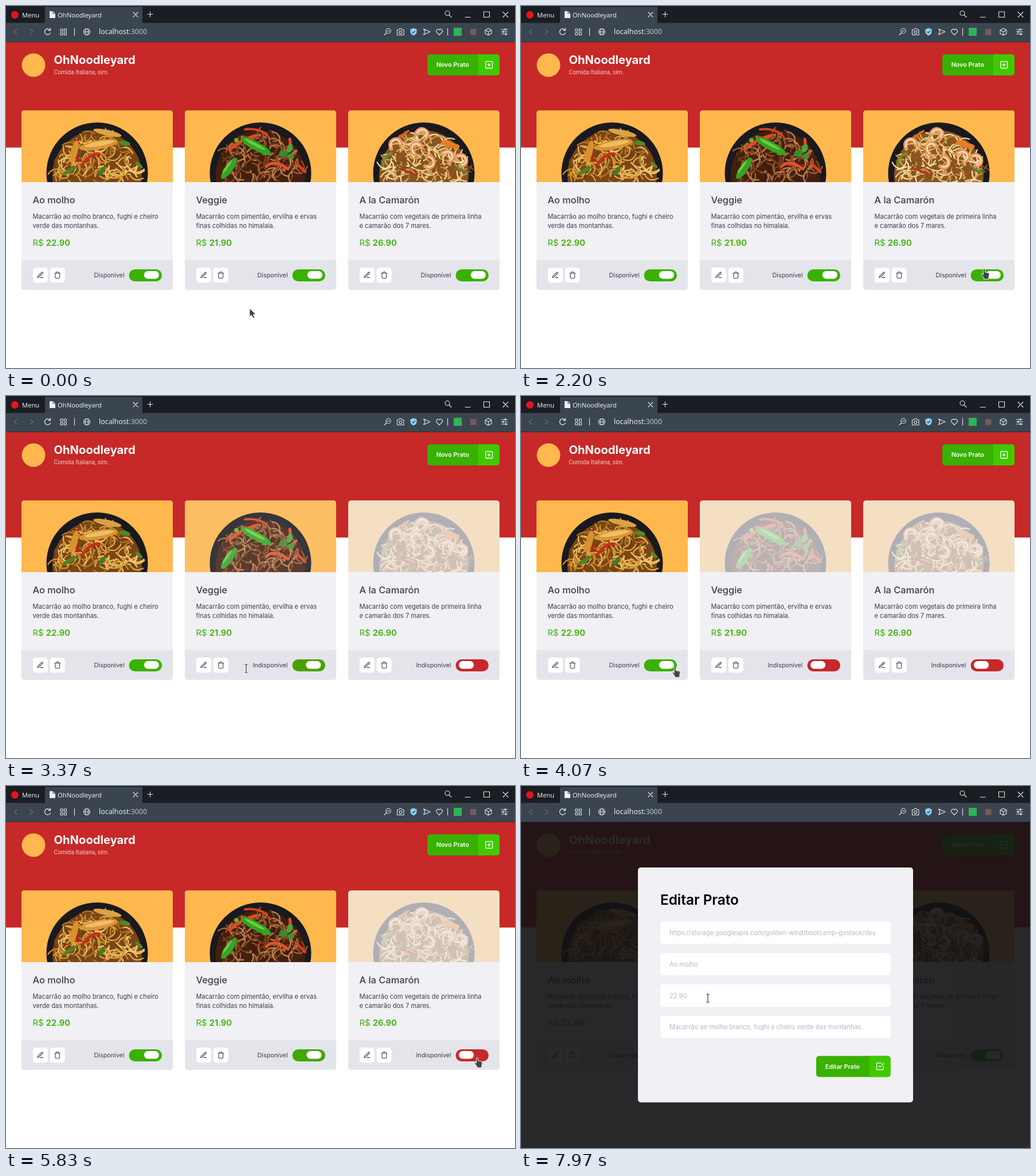
These frames come from a looping animation (888x631 px, 8 s). An HTML page:

```html
<!DOCTYPE html>
<html lang="pt">
<head>
<meta charset="utf-8">
<title>OhNoodleyard</title>
<style>
html, body { margin: 0; width: 100%; height: 100%; overflow: hidden; background: #fff; }
svg { display: block; }
text { font-family: Inter, Roboto, sans-serif; white-space: pre; }
.ui { font-family: "Noto Sans", "Open Sans", sans-serif; fill: #e9ecee; }
.icon { fill: none; stroke-width: 2; stroke-linecap: round; stroke-linejoin: round; }
.bar { fill: none; stroke: #e3e6e8; stroke-width: 1.1; stroke-linecap: round; stroke-linejoin: round; }
.name { font-size: 16.4px; font-weight: 500; fill: #3d3d4d; }
.desc { font-size: 11.05px; fill: #3d3d4d; }
.price { font-size: 14.8px; fill: #39b100; }
.price tspan, .button { font-weight: 600; }
.state { font-size: 10.8px; fill: #3d3d4d; text-anchor: end; }
.button { font-size: 10.7px; fill: #fff; }
.field { font-size: 11.05px; fill: #b7b7cc; }
.photo, .switch, .knob { animation: 8s ease infinite; }
.on, .off, .shape, #modal { animation: 8s step-end infinite; }
#cursor { animation: move 8s linear infinite; }
#modal { animation-name: modal; }
.shape { opacity: 0; }
@keyframes modal { 0% { opacity: 0 } 88.31%, to { opacity: 1 } }
</style>
</head>
<body>
<svg width="888" height="631" viewBox="0 0 888 631">
  <defs>
    <clipPath id="round"><rect width="264" height="313" rx="5"/></clipPath>
    <g id="edit" class="icon"><path d="M12 20h9M16.5 3.5a2.12 2.12 0 0 1 3 3L7 19l-4 1 1-4z"/></g>
    <g id="trash" class="icon"><path d="M3 6h18M19 6v14a2 2 0 0 1-2 2H7a2 2 0 0 1-2-2V6m3 0V4a2 2 0 0 1 2-2h4a2 2 0 0 1 2 2v2"/></g>
    <g id="plus" class="icon"><rect x="3" y="3" width="18" height="18" rx="2"/><path d="M12 8v8M8 12h8"/></g>
    <g id="check" class="icon"><path d="M9 11l3 3L22 4M21 12v7a2 2 0 0 1-2 2H5a2 2 0 0 1-2-2V5a2 2 0 0 1 2-2h11"/></g>
  </defs>

  <rect width="888" height="631" fill="#fff"/>
  <rect y="63" width="888" height="183.7" fill="#c72828"/>
  <circle cx="48" cy="103" r="20.5" fill="#ffb84d"/>
  <text x="83.5" y="100.5" font-size="20.2" font-weight="700" fill="#fff">OhNoodleyard</text>
  <text x="83.5" y="119" font-size="10.3" fill="#f5c9c4" style="font-family:Roboto,sans-serif">Comida Italiana, sim.</text>
  <g id="add"></g>
  <g id="cards"></g>

  <g id="modal">
    <rect y="63" width="888" height="568" fill="#121214" fill-opacity=".9"/>
    <rect x="204" y="142" width="480" height="409.5" rx="5" fill="#f0f0f5"/>
    <text x="243" y="207" font-size="24.3" font-weight="600">Editar Prato</text>
    <g id="fields"></g>
    <g id="save"></g>
  </g>

  <g id="browser">
    <rect width="888" height="30" fill="#1a1d21"/>
    <path d="M0 29.5H68V1.5H238V29.5H888V62H0Z" fill="#3b4550"/>
    <rect y="62" width="888" height="1" fill="#2b2f35"/>
    <circle cx="15.5" cy="15.5" r="6.5" fill="#e8131f"/>
    <text class="ui" x="28" y="20" font-size="11.2">Menu</text>
    <path d="M76 9h6l4 4v8H76Z" fill="#eef0f1"/><path d="M82 9v4h4" fill="none" stroke="#3b4550"/>
    <text class="ui" x="90" y="20" font-size="11.2">OhNoodleyard</text>
    <text class="ui" x="162" y="49.3" font-size="12.4">localhost<tspan fill="#b9c0c6">:3000</tspan></text>
    <g class="bar">
      <path d="M222 11l8 8m0-8l-8 8M247 14.5h9M251.5 10v9"/>
      <circle cx="770" cy="12.5" r="4"/><path d="M773 15.500l4 4"/>
      <path d="M801 19.5h9M867 10.5l9 9m0-9l-9 9"/><rect x="833.5" y="10" width="10" height="9.5"/>
      <path d="M19 40.5l-5 4.5 5 4.5M42 40.5l5 4.5-5 4.5" stroke="#66717b"/>
      <path d="M77 42a5.2 5.2 0 1 0 .5 5M77.5 39v3.5h-3.5" stroke-width="1.3"/>
      <path d="M95 40h4v4h-4zM101.5 40h4v4h-4zM95 46.5h4v4h-4zM101.5 46.5h4v4h-4z"/>
      <path d="M119.5 39v12M770.5 39v12"/>
      <circle cx="141" cy="45" r="5.5"/><ellipse cx="141" cy="45" rx="2.5" ry="5.5"/><path d="M135.5 45h11"/>
      <circle cx="667" cy="43.5" r="4.2"/><path d="M664 46.5l-4 4M665 43.5h4"/>
      <path d="M682.5 41.5h2.5l1.5-2h3.5l1.5 2h2.5v9h-11.5z"/><circle cx="688.3" cy="45.7" r="2.4"/>
      <path d="M728.5 40l11.5 5-11.5 5 2.5-5z"/>
      <path d="M756 50.5l-4.7-4.8a3 3 0 0 1 4.7-4 3 3 0 0 1 4.7 4z"/>
      <path d="M841.5 39l5.5 3v6l-5.5 3-5.5-3v-6zM836 42l5.5 3 5.5-3M841.5 45v6"/>
      <path d="M864.5 41h10.5M864.5 45h10.5M864.5 49h10.5"/>
      <path d="M871 40v2M867.5 44v2M872 48v2" stroke-width="2"/>
    </g>
    <path d="M711 38.5l5.5 2v4.5q0 4-5.5 6.5-5.5-2.5-5.5-6.5v-4.5z" fill="#8fd0fa"/>
    <path d="M708.5 45l2 2 3.5-4" fill="none" stroke="#24506f" stroke-width="1.3"/>
    <rect x="781" y="38" width="14" height="14" fill="#2fb457"/>
    <rect x="810" y="40" width="10.5" height="10.5" fill="#755b58"/>
  </g>

  <g id="cursor" stroke="#fff" stroke-width=".9" stroke-linejoin="round">
    <path class="shape" id="arrow" fill="#434343" d="M0 0V14.5L3.3 12 6.3 17.2 8.8 15.8 6.3 11 10.5 10Z"/>
    <path class="shape" id="hand" fill="#434343" d="M-1.500 1Q0-1.5 1.5 1V6L7.5 7.2Q9.5 7.8 9 10L8 14.5V18H-.5V15.5L-5 10Q-4.5 8-2.5 9.3L-1.5 10.5Z"/>
    <g class="shape" id="beam" fill="none"><path stroke-width="2.6" d="M-2.5-7H2.5M0-7V7M-2.5 7H2.5"/><path stroke="#222" stroke-width="1.1" d="M-2.5-7H2.5M0-7V7M-2.5 7H2.5"/></g>
  </g>
</svg>
<script>
const $ = id => document.getElementById(id);
const pct = ms => (ms / 80).toFixed(3) + '%';
const icon = (id, x, y, size, color) =>
  `<g transform="translate(${x - size / 2} ${y - size / 2}) scale(${size / 24})" stroke="${color}"><use href="#${id}"/></g>`;

function button(x, y, w, label, glyph) {
  const cut = w - 37;
  return `<g transform="translate(${x} ${y})"><rect width="${w}" height="36.7" rx="5" fill="#39b100"/>
    <path d="M${cut} 0h32a5 5 0 0 1 5 5v26.7a5 5 0 0 1-5 5h-32z" fill="#41c900"/>
    <text class="button" x="15.7" y="22">${label}</text>${icon(glyph, w - 18.3, 18.3, 15.7, '#fff')}</g>`;
}

const blob = (x, y, rx, ry, turn, color) =>
  `<ellipse rx="${rx}" ry="${ry}" fill="${color}" transform="translate(${x} ${y}) rotate(${turn})"/>`;
const strip = (d, color, w) =>
  `<path d="${d}" fill="none" stroke="${color}" stroke-width="${w}" stroke-linecap="round"/>`;

// Loose noodles scattered over the plate
function noodles(seed, tones) {
  const rnd = () => (seed = seed * 16807 % 2147483647) / 2147483647;
  let out = '';
  for (let i = 0; i < 130; i++) {
    const a = Math.PI * (1 + rnd()), r = 76 * Math.sqrt(rnd());
    const x = 132 + r * Math.cos(a), y = 120 + r * Math.sin(a) * 1.05;
    const t = rnd() * 6.28, dx = 13 * Math.cos(t), dy = 11 * Math.sin(t);
    out += strip(`M${x - dx} ${y - dy}Q${x + dy} ${y - dx} ${x + dx} ${y + dy}`, tones[i % tones.length], 2.2);
  }
  return out;
}

const shrimp = (x, y, turn) => `<g transform="translate(${x} ${y}) rotate(${turn})">` +
  strip('M-10 5Q-9-9 3-7 13-4 8 7', '#e8955f', 7) + strip('M-9 2Q-6-8 3-7 10-4 8 4', '#fbdcc0', 2.5) + '</g>';

const cards = [
  { name: 'Ao molho', lines: ['Macarrão ao molho branco, fughi e cheiro', 'verde das montanhas.'], price: '22.90',
    off: 4310, on: 4860, base: '#7a4615', seed: 71, tones: ['#e2ac4c', '#b97a27', '#f0c66c', '#d4942f', '#6b3d14'],
    extra: strip('M98 52Q90 72 99 88', '#c3201a', 5) + strip('M107 94Q120 74 136 76', '#cf2a1c', 5) +
      blob(134, 60, 34, 8, -10, '#d99536') + blob(136, 58, 26, 4, -10, '#f0bd67') + blob(150, 39, 25, 5, 12, '#dca244') +
      blob(92, 72, 6, 20, 15, '#d8922e') + blob(180, 57, 10, 4, 10, '#4f8a25') + blob(84, 105, 15, 3.5, -30, '#4d8427') +
      blob(140, 106, 9, 4, -55, '#3d7d27') + blob(205, 95, 8, 3, 40, '#53892a') },
  { name: 'Veggie', lines: ['Macarrão com pimentão, ervilha e ervas', 'finas colhidas no himalaia.'], price: '21.90',
    off: 3325, on: 5560, base: '#44200e', seed: 907, tones: ['#a9653a', '#74401f', '#c28452', '#8d4f29', '#3b1d0e'],
    extra: strip('M78 69Q98 50 124 44', '#e5481f', 5) + strip('M105 33Q128 30 143 42', '#dd421d', 4) +
      strip('M142 98Q155 84 180 102', '#e5502a', 5) + strip('M183 50Q187 62 176 72', '#e24c21', 5) +
      strip('M194 92L210 107', '#d93d1c', 5) + blob(124, 62, 30, 7.5, 28, '#2fa51f') + blob(122, 59, 20, 2.5, 28, '#6dcc42') +
      blob(77, 101, 22, 7, -55, '#33a524') + blob(74, 98, 14, 2, -55, '#72c944') + blob(90, 52, 4, 4, 0, '#73ad2b') +
      blob(172, 75, 8, 6, -20, '#398a2c') + blob(183, 66, 5, 8, 20, '#4ba238') + blob(185, 80, 6, 5, 0, '#43912e') },
  { name: 'A la Camarón', lines: ['Macarrão com vegetais de primeira linha', 'e camarão dos 7 mares.'], price: '26.90',
    off: 2560, on: 5960, base: '#8a5520', seed: 4407, tones: ['#efd08d', '#cc9547', '#f8e2ae', '#dfb368', '#81501f'],
    extra: strip('M61 97Q60 78 76 75', '#6d9130', 4) + strip('M166 56L190 63', '#ec7b21', 8) +
      strip('M92 102L118 113', '#b53328', 4) + strip('M88 47L105 36', '#d9651f', 4) + strip('M190 98L208 109', '#65892e', 4) +
      shrimp(82, 58, -25) + shrimp(129, 40, 20) + shrimp(142, 90, 95) + shrimp(174, 79, 40) + shrimp(118, 66, -60) + shrimp(198, 86, 60) }
];

let css = '';
$('cards').innerHTML = cards.map((c, i) => {
  const flip = (name, ms, a, b) =>
    `@keyframes ${name}${i}{0%,${pct(c.off)}{${a}}${pct(c.off + ms)},${pct(c.on)}{${b}}${pct(c.on + ms)},to{${a}}}`;
  const step = (name, a, b) =>
    `@keyframes ${name}${i}{0%{opacity:${a}}${pct(c.off)}{opacity:${b}}${pct(c.on)},to{opacity:${a}}}`;
  css += flip('photo', 300, 'opacity:1', 'opacity:.3') + flip('switch', 400, 'fill:#39b100', 'fill:#c72828') +
    flip('knob', 400, 'transform:translateX(20.7px)', 'transform:none') + step('on', 1, 0) + step('off', 0, 1);
  const anim = name => `class="${name}" style="animation-name:${name}${i}"`;
  return `<g transform="translate(${27 + 285 * i} 182)"><g clip-path="url(#round)">
    <rect width="264" height="313" fill="#f0f0f5"/>
    <svg width="264" height="125"><g ${anim('photo')}>
      <rect width="264" height="125" fill="#ffb84d"/><circle cx="132" cy="109.5" r="88.5" fill="#19191e"/>
      <circle cx="132" cy="113" r="78" fill="${c.base}"/>${noodles(c.seed, c.tones)}${c.extra}</g></svg>
    <rect y="261" width="264" height="52" fill="#e4e4eb"/></g>
    <text class="name" x="19.5" y="162">${c.name}</text>
    ${c.lines.map((s, n) => `<text class="desc" x="19.5" y="${189 + 16 * n}">${s}</text>`).join('')}
    <text class="price" x="19.5" y="236">R$ <tspan>${c.price}</tspan></text>
    <rect x="20" y="274" width="26" height="26.3" rx="5" fill="#fff"/><rect x="49.7" y="274" width="26" height="26.3" rx="5" fill="#fff"/>
    ${icon('edit', 32.8, 287, 13.1, '#3d3d4d')}${icon('trash', 62.8, 287, 13.1, '#3d3d4d')}
    <g ${anim('on')}><text class="state" x="179.5" y="291">Disponível</text></g>
    <g ${anim('off')}><text class="state" x="179.5" y="291">Indisponível</text></g>
    <rect ${anim('switch')} x="187.5" y="277" width="57.5" height="21" rx="10.5"/>
    <rect ${anim('knob')} x="193" y="280" width="26.2" height="13.5" rx="6.7" fill="#fff"/></g>`;
}).join('');

$('add').innerHTML = button(735, 84.3, 126, 'Novo Prato', 'plus');
$('save').innerHTML = button(515, 470.5, 129.7, 'Editar Prato', 'check');
$('fields').innerHTML = ['https://storage.googleapis.com/golden-wind/bootcamp-gostack/des', 'Ao molho', '22.90',
  'Macarrão ao molho branco, fughi e cheiro verde das montanhas.'].map((s, i) =>
  `<svg x="243" y="${236 + 54.8 * i}" width="402" height="39.3"><rect width="402" height="39.3" rx="5" fill="#fff"/>
   <svg width="386.5" height="39.3"><text class="field" x="16" y="24">${s}</text></svg></svg>`).join('');

// Pointer path: time, x, y
const path = [
  [0, 425, 527], [1390, 425, 527], [1600, 500, 488], [1850, 650, 440], [2020, 745, 420], [2190, 808, 458],
  [2640, 808, 458], [2850, 770, 478], [3100, 620, 482], [3250, 540, 472], [3310, 520, 471], [3365, 419, 475],
  [3425, 419, 475], [3600, 345, 476], [3900, 275, 474], [4225, 263, 471], [4920, 263, 471], [5150, 380, 473],
  [5380, 510, 472], [5525, 540, 472], [5610, 540, 472], [5700, 660, 475], [5825, 822, 473], [6030, 822, 473],
  [6200, 690, 488], [6370, 440, 496], [6550, 190, 482], [6695, 60, 470], [6800, 56.5, 469], [7290, 56.5, 469],
  [7420, 90, 447], [7600, 200, 395], [7800, 318, 361], [7960, 326, 370]
];
const spot = ([ms, x, y]) => `${pct(ms)}{transform:translate(${x}px,${y}px)}`;
css += `@keyframes move{${path.map(spot).join('')}${spot([8000, 326, 370])}}`;

const shapes = [
  [0, 'arrow'], [2130, 'hand'], [2800, 'arrow'], [3190, 'hand'], [3340, 'beam'], [3440, 'arrow'], [3920, 'hand'],
  [5010, 'arrow'], [5370, 'hand'], [5630, 'arrow'], [5790, 'hand'], [6090, 'arrow'], [7670, 'beam']
];
for (const id of ['arrow', 'hand', 'beam']) {
  css += `@keyframes ${id}{${shapes.map(([ms, s]) => `${pct(ms)}{opacity:${+(s === id)}}`).join('')}to{opacity:${+(id === 'beam')}}}`;
  $(id).style.animationName = id;
}
document.head.append(Object.assign(document.createElement('style'), { textContent: css }));
</script>
</body>
</html>
```
